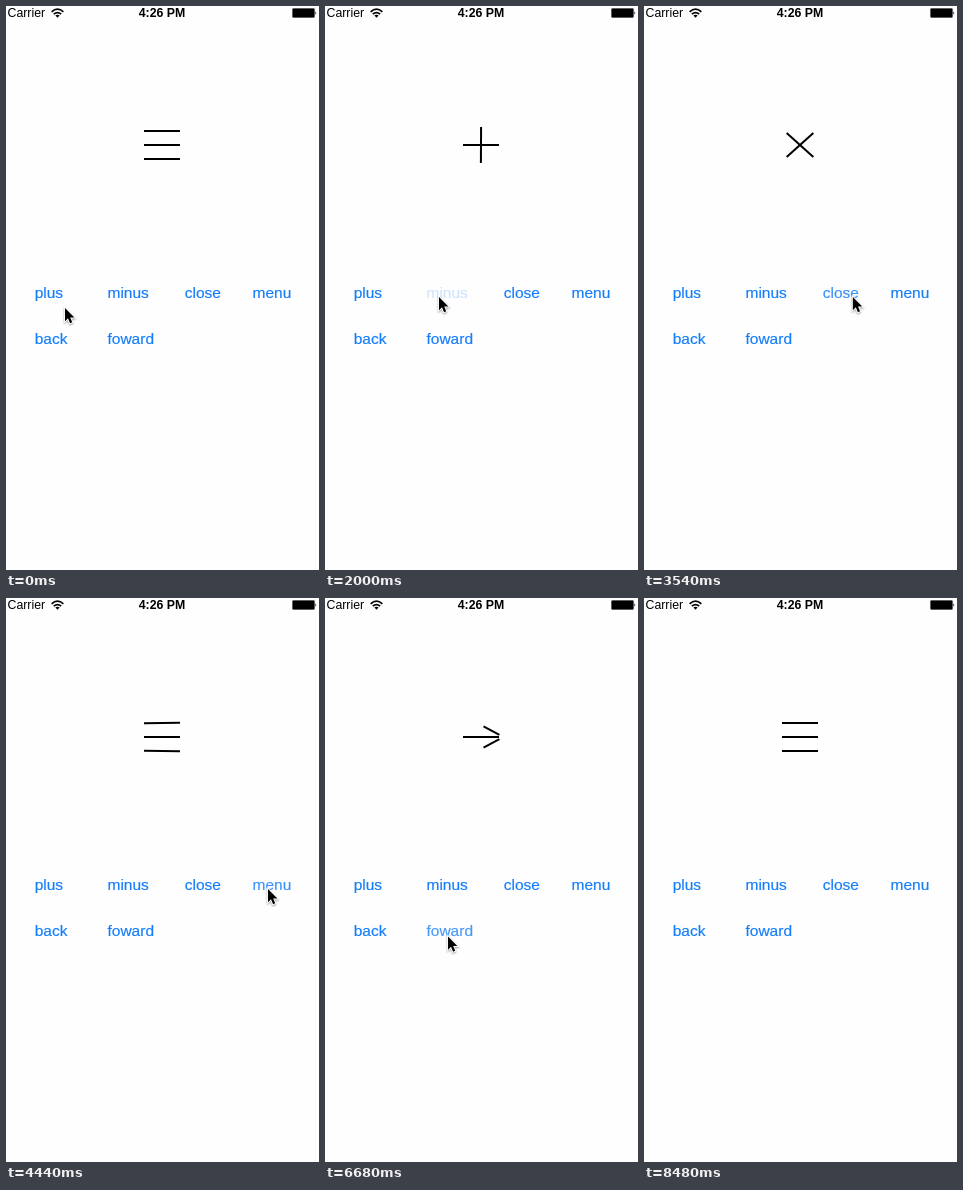
An HTML page with a canvas for the animation above (9010 ms loop, 313 by 564 pixels).

```html
<!DOCTYPE html>
<html lang="en">
<head>
<meta charset="utf-8">
<title>Morphing menu button</title>
<style>
  html, body { margin: 0; width: 100%; height: 100%; overflow: hidden; background: #fefefe; }
  svg, canvas { position: absolute; left: 0; top: 0; width: 313px; height: 564px; display: block; }
  text { font-family: "Liberation Sans", Arial, sans-serif; }
  .status { font-size: 12.3px; }
  .button { font-size: 15.5px; fill: #157efb; stroke: #157efb; stroke-width: .2px; }
</style>
</head>
<body>
<svg viewBox="0 0 313 564">
  <g class="status">
    <text x="1.5" y="11.2">Carrier</text>
    <text x="156" y="11.2" text-anchor="middle" font-weight="bold">4:26 PM</text>
  </g>
  <g fill="none" stroke="#000" stroke-width="1.7">
    <path d="M45.6 5.8 Q51.5 .6 57.4 5.8"/>
    <path d="M47.8 8.2 Q51.5 5 55.2 8.2"/>
  </g>
  <path d="M49.4 9.6 Q51.5 8 53.6 9.6 L51.5 11.8 Z"/>
  <rect x="286.5" y="2.5" width="22" height="9" rx="1" stroke="#555" stroke-width=".8"/>
  <path d="M309.4 5.3 Q311.2 7 309.4 8.7 Z"/>
  <g class="button">
    <text id="plus" x="28.7" y="292.2">plus</text>
    <text id="minus" x="101.5" y="292.2">minus</text>
    <text id="close" x="178.7" y="292.2">close</text>
    <text id="menu" x="246.5" y="292.2">menu</text>
    <text id="back" x="28.7" y="338.2">back</text>
    <text id="foward" x="101.5" y="338.2">foward</text>
  </g>
</svg>
<canvas id="stage"></canvas>
<script>
const LOOP = 9010, MID_X = 156, MID_Y = 139, RAD = Math.PI / 180;
const canvas = document.getElementById('stage');
const ctx = canvas.getContext('2d');
const dpr = window.devicePixelRatio || 1;
canvas.width = 313 * dpr;
canvas.height = 564 * dpr;

// dx, dy: centre of the upper bar; top, bottom: bar angles; half: half length; mid: middle bar opacity
const pose = (dx, dy, top, bottom, half = 18, mid = 1) => ({ dx, dy, top, bottom, half, mid });
const MENU = pose(0, -14, 0, 0);

// button, time of press, time of release, pose it leads to
const taps = [
  ['plus', 1060, 1160, pose(0, 0, -90, 0)],
  ['minus', 2000, 2165, pose(0, 0, 0, 0)],
  ['close', 3120, 3300, pose(0, 0, -45, 45, 18, 0)],
  ['menu', 4100, 4210, MENU],
  ['back', 5280, 5395, pose(-11.6, -6.4, -45, 45, 9)],
  ['foward', 6320, 6485, pose(11.6, -6.4, -135, 135, 9)],
  ['menu', 7580, 7700, pose(0, -14, -180, 180)]
];

// time, x, y of the pointer tip
const track = [
  [290, 59, 302], [760, 47, 291],
  [1420, 47, 291], [1920, 114, 291],
  [2240, 114, 291], [2640, 180.5, 291], [2890, 196, 291],
  [3380, 196, 291], [3950, 262, 291],
  [4500, 262, 291], [5220, 47, 333.5],
  [5650, 47, 333.5], [6140, 123, 338.5],
  [6760, 123, 338.5], [7110, 239, 298], [7400, 267, 293],
  [7880, 267, 293], [8470, 265, 525]
];

const labels = {};
for (const [name] of taps) labels[name] = document.getElementById(name);

const mix = (a, b, k) => a + (b - a) * k;
const clamp = v => Math.max(0, Math.min(1, v));

function spring(ms, freq, damping) {
  const t = ms / 1000, decay = freq * damping;
  const wave = freq * Math.sqrt(1 - damping * damping);
  return 1 - Math.exp(-decay * t) * (Math.cos(wave * t) + decay / wave * Math.sin(wave * t));
}

function poseAt(t) {
  let from = MENU, to = MENU, start = 0;
  for (const [, , release, next] of taps) {
    if (t < release) break;
    from = to;
    to = next;
    start = release;
  }
  const turn = spring(t - start, 22.9, 0.284);
  const move = spring(t - start, 16, 0.75);
  const now = {};
  for (const key in to) {
    const k = key === 'top' || key === 'bottom' ? turn : move;
    now[key] = mix(from[key], to[key], k);
  }
  return now;
}

function bar(x, y, angle, half) {
  const dx = Math.cos(angle * RAD) * half, dy = Math.sin(angle * RAD) * half;
  ctx.beginPath();
  ctx.moveTo(x - dx, y - dy);
  ctx.lineTo(x + dx, y + dy);
  ctx.stroke();
}

function drawIcon(t) {
  const p = poseAt(t);
  ctx.strokeStyle = '#000';
  ctx.lineWidth = 2;
  bar(MID_X + p.dx, MID_Y + p.dy, p.top, p.half);
  bar(MID_X + p.dx, MID_Y - p.dy, p.bottom, p.half);
  ctx.globalAlpha = clamp(p.mid);
  bar(MID_X, MID_Y, 0, 18);
  ctx.globalAlpha = 1;
}

function fadeLabels(t) {
  const alpha = {};
  for (const [name, press, release] of taps) {
    if (t >= press) alpha[name] = 1 - 0.8 * Math.exp(-Math.max(0, t - release) / 150);
  }
  for (const name in labels) labels[name].style.opacity = alpha[name] ?? 1;
}

function pointerAt(t) {
  const i = track.findIndex(k => k[0] > t);
  if (i <= 0) return track[i < 0 ? track.length - 1 : 0].slice(1);
  const [t0, x0, y0] = track[i - 1], [t1, x1, y1] = track[i];
  const u = (t - t0) / (t1 - t0), k = u * u * (3 - 2 * u);
  return [mix(x0, x1, k), mix(y0, y1, k)];
}

const arrow = new Path2D('M0 0 V13.2 L3 10.3 L5.1 15.2 L7.2 14.3 L5.2 9.5 H9.4 Z');

function drawPointer(t) {
  if (t >= 8480) return;
  ctx.save();
  ctx.translate(...pointerAt(t));
  ctx.shadowColor = 'rgba(0,0,0,.4)';
  ctx.shadowBlur = 2 * dpr;
  ctx.shadowOffsetY = dpr;
  ctx.strokeStyle = '#fff';
  ctx.lineWidth = 1.8;
  ctx.stroke(arrow);
  ctx.shadowColor = 'transparent';
  ctx.fillStyle = '#000';
  ctx.fill(arrow);
  ctx.restore();
}

const began = performance.now();

function draw() {
  const t = (performance.now() - began) % LOOP;
  ctx.setTransform(dpr, 0, 0, dpr, 0, 0);
  ctx.clearRect(0, 0, 313, 564);
  fadeLabels(t);
  drawIcon(t);
  drawPointer(t);
  requestAnimationFrame(draw);
}
draw();
</script>
</body>
</html>
```
